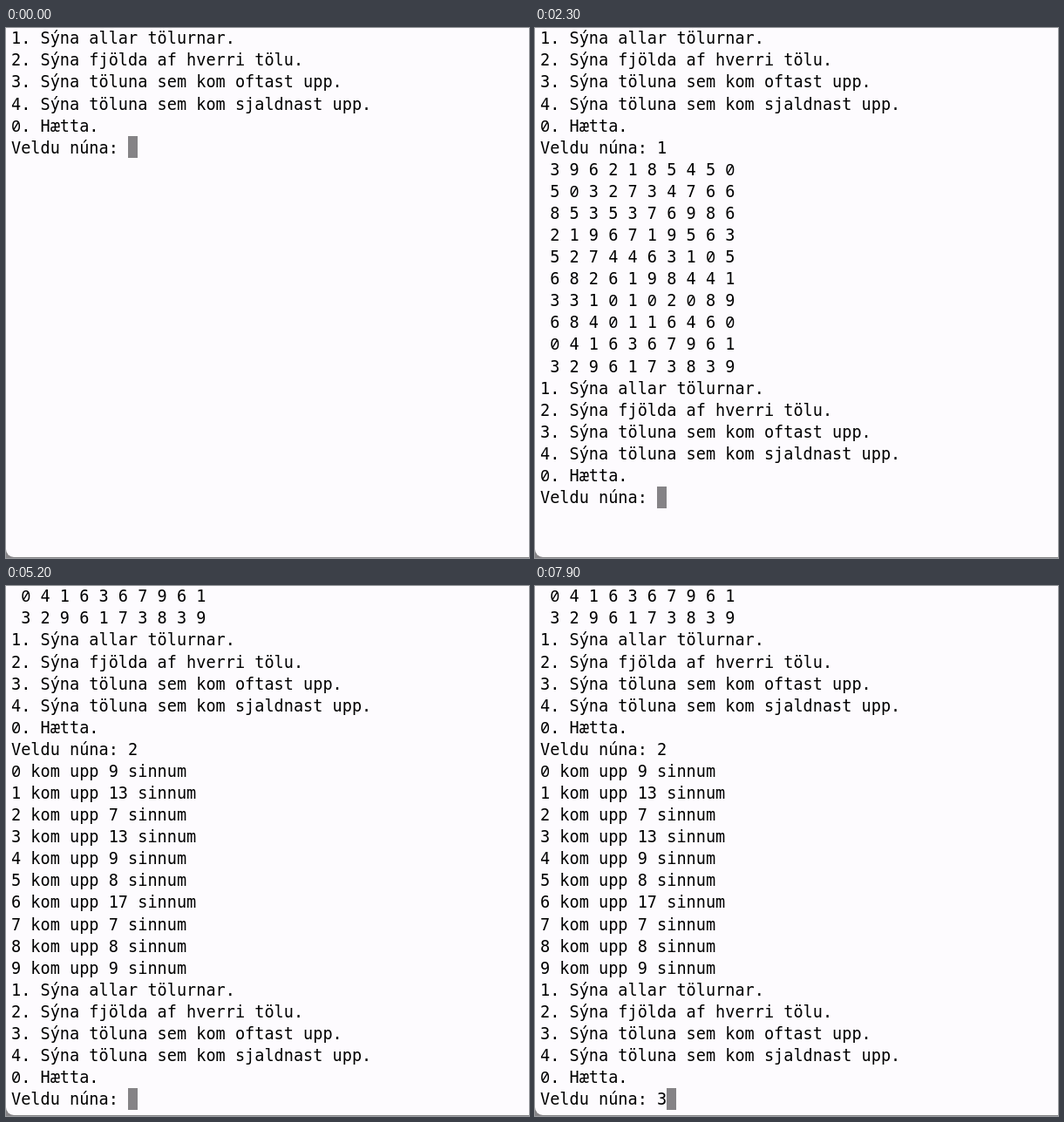
Recreate the animation shown at these times as an HTML page with a canvas. Size 600x608 px, loop 8 s.

```html
<!DOCTYPE html>
<html lang="is">
<head>
<meta charset="utf-8">
<style>
  html, body { margin: 0; height: 100%; overflow: hidden; background: #fdfbfe; }
  canvas { display: block; }
</style>
</head>
<body>
<canvas id="screen" width="600" height="608"></canvas>
<script>
const ctx = document.getElementById('screen').getContext('2d');
const LOOP = 8000, ROWS = 24;
const LEFT = 6, CHAR = 11.17, LINE = 25.08, BASELINE = 18.3;
const FONT = '18.56px "DejaVu Sans Mono", monospace';
const ZERO_FONT = '18.6px "Noto Sans Mono", monospace'; // slashed zero

const menu = [
  '1. Sýna allar tölurnar.',
  '2. Sýna fjölda af hverri tölu.',
  '3. Sýna töluna sem kom oftast upp.',
  '4. Sýna töluna sem kom sjaldnast upp.',
  '0. Hætta.',
  'Veldu núna: '
];
const numbers = [
  '3962185450', '5032734766', '8535376986', '2196719563', '5274463105',
  '6826198441', '3310102089', '6840116460', '0416367961', '3296173839'
];
const table = numbers.map(row => ' ' + [...row].join(' '));
const counts = [...'0123456789'].map(digit =>
  `${digit} kom upp ${numbers.join('').split(digit).length - 1} sinnum`);

// Each choice is typed, then answered by its output and a fresh menu.
const choices = [
  { key: '1', typed: 1700, answered: 2300, output: table },
  { key: '2', typed: 4100, answered: 4800, output: counts },
  { key: '3', typed: 7400, answered: Infinity, output: [] }
];

function terminalLines(time) {
  const lines = [...menu];
  for (const { key, typed, answered, output } of choices) {
    if (time >= typed) lines[lines.length - 1] += key;
    if (time >= answered) lines.push(...output, ...menu);
  }
  return lines.slice(-ROWS);
}

function drawWindow() {
  ctx.fillStyle = '#858487';
  ctx.fillRect(0, 0, 600, 608);
  ctx.fillStyle = '#fdfbfe';
  ctx.beginPath();
  ctx.roundRect(0, -20, 640, 627, 9);
  ctx.fill();
}

function drawLine(text, row) {
  [...text].forEach((char, col) => {
    ctx.font = char === '0' ? ZERO_FONT : FONT;
    ctx.fillText(char, LEFT + col * CHAR, BASELINE + row * LINE);
  });
}

function draw(now) {
  const lines = terminalLines(now % LOOP);
  const last = lines.length - 1;
  drawWindow();
  ctx.fillStyle = '#858386';
  ctx.fillRect(Math.round(LEFT + lines[last].length * CHAR), Math.round(last * LINE - 1), 11, 25);
  ctx.fillStyle = '#000';
  lines.forEach(drawLine);
  requestAnimationFrame(draw);
}
requestAnimationFrame(draw);
</script>
</body>
</html>
```
